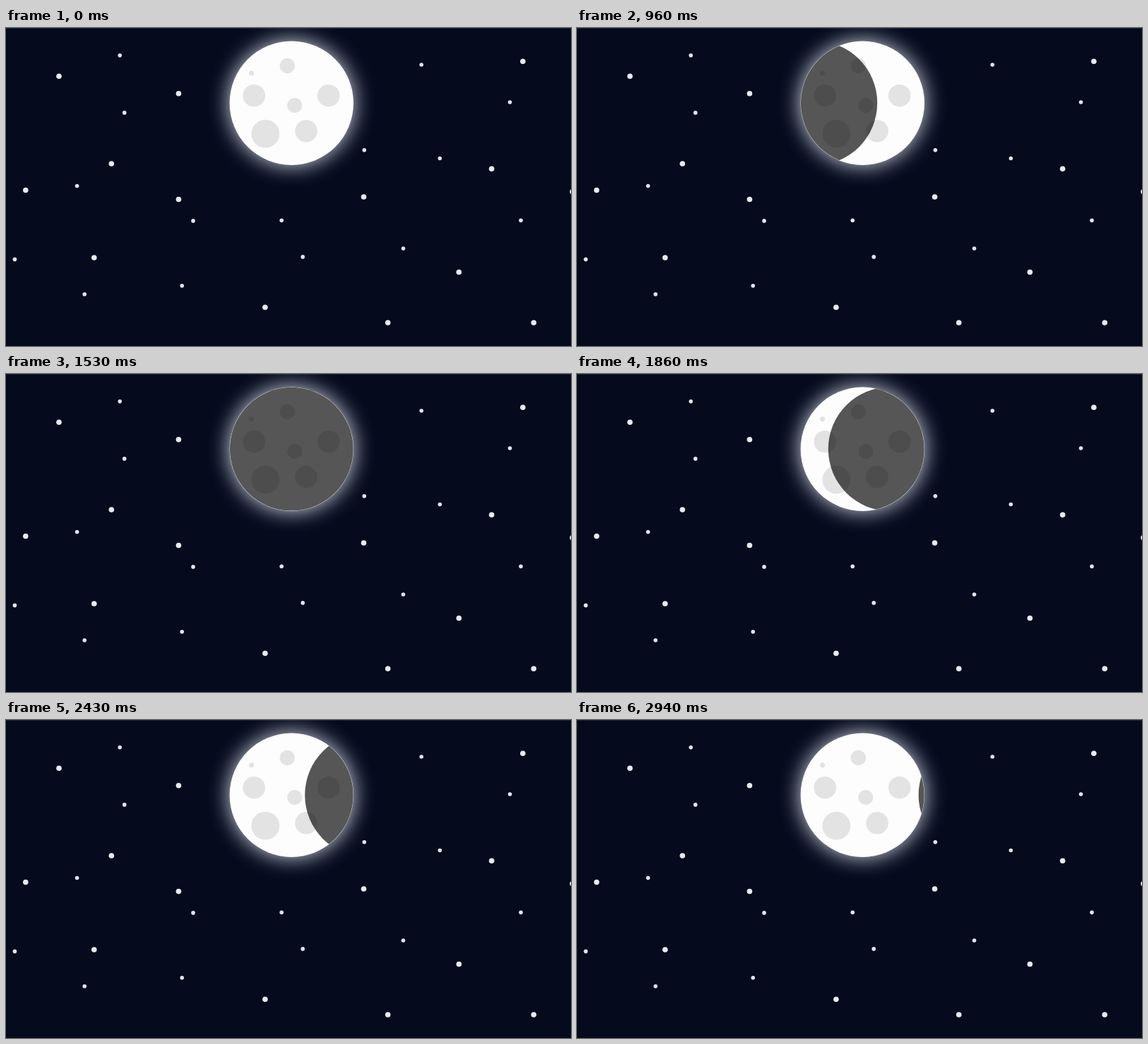
These frames come from a looping animation (800 by 450 pixels, 2.97 s). An HTML page with a canvas:

```html
<!DOCTYPE html>
<html>
<head>
<meta charset="utf-8">
<style>
html, body { margin: 0; width: 100%; height: 100%; overflow: hidden; background: #050a1d; }
canvas { display: block; }
</style>
</head>
<body>
<canvas width="800" height="450"></canvas>
<script>
const ctx = document.querySelector('canvas').getContext('2d');
const LOOP = 2970, STEP = 30;
const MOON = { x: 404.3, y: 106.2, r: 87.7 };

const bigStars = [
  [75, 68.2], [244.4, 92.8], [149.3, 192], [27.8, 229.5], [244.4, 242.5], [124.8, 325],
  [366.9, 395.2], [506.5, 239], [687.6, 199.2], [641.3, 345.5], [540.7, 417], [747.2, 417],
  [731.8, 47.3], [802, 231.6]
];
const smallStars = [
  [161.2, 38.8], [167.7, 119.9], [100.6, 223.5], [265, 272.9], [12.4, 327.4], [111.2, 376.7],
  [249.2, 364.8], [390.2, 272.3], [420.2, 323.9], [507.3, 172.8], [588.2, 52], [614.3, 184.5],
  [713.5, 105], [729, 272.3], [562.5, 312]
];
const craters = [
  [398.3, 53.5, 10.7], [347.6, 63.8, 3.6], [351.2, 95.7, 15.8], [456.7, 95.7, 15.8],
  [408.8, 109.6, 10.6], [367.3, 149.7, 19.9], [425, 145.8, 15.8]
];

function disc(x, y, r, fill) {
  ctx.beginPath();
  ctx.arc(x, y, r, 0, Math.PI * 2);
  ctx.fillStyle = fill;
  ctx.fill();
}

function drawSky() {
  ctx.fillStyle = '#050a1d';
  ctx.fillRect(0, 0, 800, 450);
  ctx.fillStyle = '#1c202d';
  ctx.fillRect(0, 0, 800, 1);
  for (const [x, y] of bigStars) disc(x, y, 3.8, '#e9eaee');
  for (const [x, y] of smallStars) disc(x, y, 2.8, '#e4e5ea');
}

function drawMoon() {
  ctx.save();
  ctx.shadowColor = 'rgba(238, 243, 255, 0.9)';
  ctx.shadowBlur = 30;
  disc(MOON.x, MOON.y, MOON.r, '#fdfdfd');
  ctx.restore();
  for (const [x, y, r] of craters) disc(x, y, r, '#e3e3e3');
}

// The shade crosses at constant speed, leaving a thin bright rim.
function drawShade(t) {
  ctx.save();
  ctx.beginPath();
  ctx.arc(MOON.x, MOON.y, MOON.r - 0.3, 0, Math.PI * 2);
  ctx.clip();
  disc(223.5 + 0.1184 * t, MOON.y, 88, 'rgba(0, 0, 0, 0.66)');
  ctx.restore();
}

function frame() {
  const t = Math.floor(performance.now() % LOOP / STEP) * STEP;
  drawSky();
  drawMoon();
  drawShade(t);
  requestAnimationFrame(frame);
}
frame();
</script>
</body>
</html>
```
